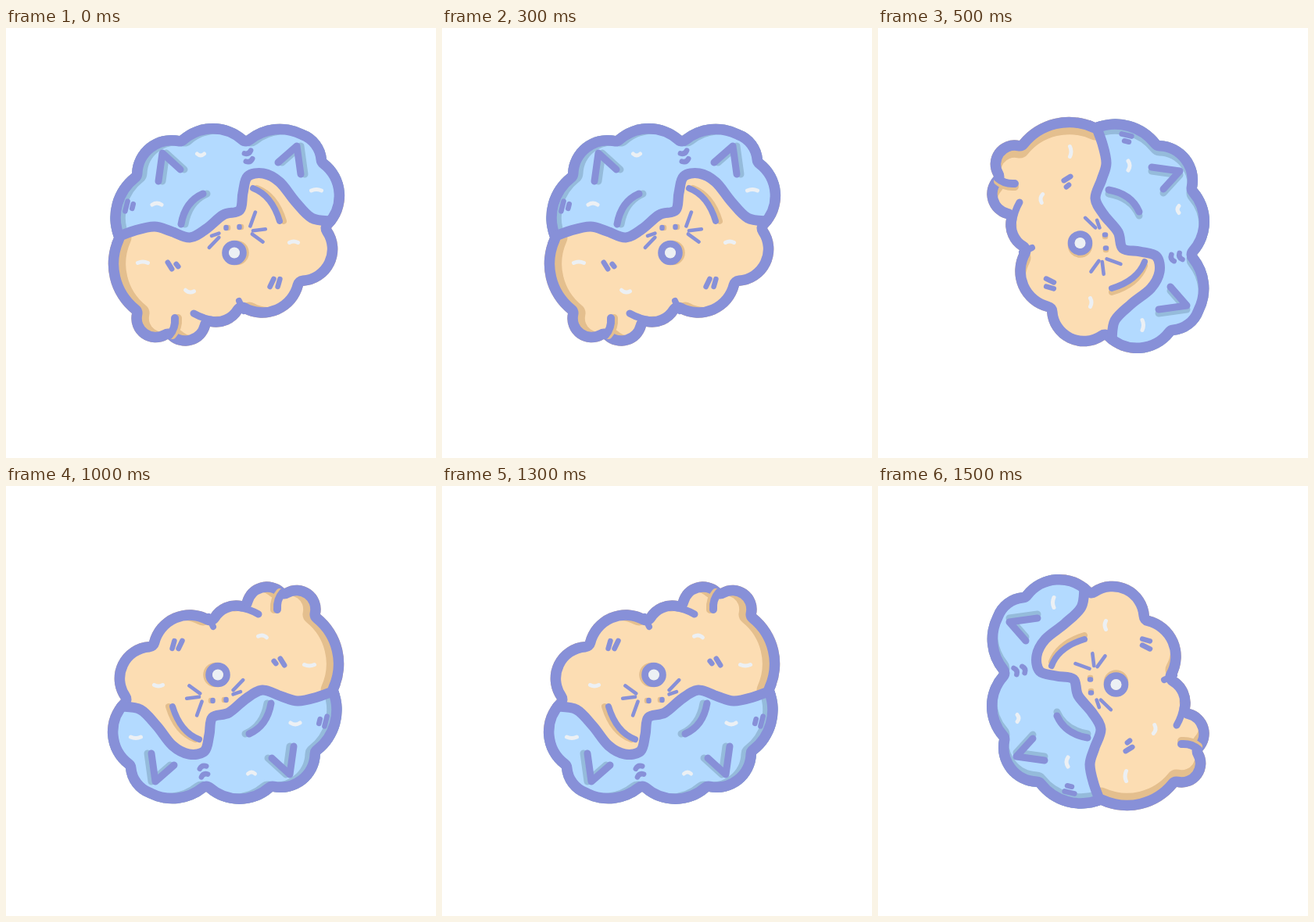
These frames come from a looping animation (550x550 px, 2000 ms). An HTML page:

```html
<!DOCTYPE html>
<html>
<head>
<meta charset="utf-8">
<style>
html, body { margin: 0; width: 100%; height: 100%; overflow: hidden; background: #fff; }
svg { display: block; width: 100vw; height: 100vh; }
</style>
</head>
<body>
<svg viewBox="0 0 550 550">
  <defs>
    <clipPath id="inside"><path id="insidePath"/></clipPath>
    <clipPath id="above"><path id="abovePath"/></clipPath>
  </defs>
  <g id="pet" fill="none" stroke-linecap="round" stroke-linejoin="round"></g>
</svg>
<script>
const NS = 'http://www.w3.org/2000/svg';
const byId = id => document.getElementById(id);
const pet = byId('pet');
const INK = '#8790d8', SHINE = '#ecf0f4';
const BLUE = { base: '#b3daff', shade: '#95bbdb', dx: 6 };
const PEACH = { base: '#fcddb3', shade: '#e4bf8e', dx: 9 };
const EDGE = 13.5;

function add(tag, attrs, parent = pet) {
  const el = document.createElementNS(NS, tag);
  for (const k in attrs) el.setAttribute(k, attrs[k]);
  return parent.appendChild(el);
}
const line = (d, stroke, width, dx = 0, parent = pet) =>
  add('path', { d, stroke, 'stroke-width': width, transform: `translate(${dx} 0)` }, parent);

// Round lobes: each reaches x, y with an arc that bulges out by h
function lobes(x, y, list) {
  let d = `M${x},${y}`;
  for (const [nx, ny, h] of list) {
    const half = Math.hypot(nx - x, ny - y) / 2;
    const r = (half * half + h * h) / (2 * h);
    d += `A${r},${r} 0 0 1 ${nx},${ny}`;
    [x, y] = [nx, ny];
  }
  return d + 'Z';
}

// Smooth curve through a few points
function curve(p) {
  let d = 'M' + p[0];
  for (let i = 0; i < p.length - 1; i++) {
    const a = p[i - 1] || p[i], b = p[i], c = p[i + 1], e = p[i + 2] || c;
    const h1 = b.map((v, k) => v + (c[k] - a[k]) / 6);
    const h2 = c.map((v, k) => v - (e[k] - b[k]) / 6);
    d += `C${h1} ${h2} ${c}`;
  }
  return d;
}

const body = lobes(138, 268, [
  [161, 186, 14], [222, 138, 18], [307, 138, 16], [381, 130, 11], [410, 168, 7],
  [416, 256, 20], [380, 330, 24], [302, 364, 21], [261, 382, 7],
  [207, 398, 16], [161, 365, 18.5], [138, 268, 17]
]);
const divider = curve([
  [138, 269], [165, 259], [190, 254], [211, 260], [235, 268], [256, 257], [278, 239], [299, 233],
  [303, 211], [309, 190], [329, 186], [350, 197], [370, 222], [391, 243], [416, 247]
]);
byId('insidePath').setAttribute('d', body);
byId('abovePath').setAttribute('d', divider + 'L550,0 L0,0Z');

// Coat with shade along every left-facing edge
const inside = add('g', { 'clip-path': 'url(#inside)' });
function coat(tone, clip) {
  const g = add('g', clip ? { 'clip-path': clip } : {}, inside);
  add('path', { d: body, fill: tone.base }, g);
  line(body, tone.shade, EDGE * 2, tone.dx, g);
}
coat(PEACH);
coat(BLUE, 'url(#above)');
line(body, INK, EDGE * 2, 0, inside);
line(divider, INK, 13, 0, inside);

// Ink stroke with a soft shadow to its right
function stamp(d, tone, width, dx = 5) {
  line(d, tone.shade, width, dx);
  line(d, INK, width);
}

// Ears, closed eyes, folds
stamp('M195,196 L200,160 L223,181', BLUE, 9);
stamp('M348,172 L372,151 L377,187', BLUE, 9);
stamp('M224,251 Q229,222 252,212', BLUE, 9);
stamp('M316,205 Q340,214 350,247', PEACH, 8);
stamp('M216,371 Q217,384 209,393', PEACH, 10, 4);
line('M240,365 Q252,372 267,374', INK, 9);
line('M298,349 L304,362', INK, 8);

// Snout
for (const [dx, tone] of [[3, PEACH.shade], [0, INK]])
  add('circle', { cx: 292 + dx, cy: 287.5, r: 11.3, stroke: tone, 'stroke-width': 9 });
add('circle', { cx: 292, cy: 287.5, r: 7, fill: SHINE });
stamp('M281.5,255 v1', PEACH, 6.5, 2.5);
stamp('M298.5,254 v1', PEACH, 6.5, 2.5);

// Whiskers fan out from a point: angle, inner and outer radius
function fan(x, y, rays) {
  for (const [deg, from, to] of rays) {
    const c = Math.cos(deg * Math.PI / 180), s = Math.sin(deg * Math.PI / 180);
    line(`M${x + c * from},${y + s * from} L${x + c * to},${y + s * to}`, INK, 4.6);
  }
}
fan(310, 260, [[-70, 7, 26], [-7, 6, 22], [36, 6, 23]]);
fan(280, 260, [[134, 11, 29], [161, 8, 18]]);

// Short strokes: centre, tilt, length, bend
function dash([x, y, deg, len, bend = 0], color, width) {
  const el = line(`M${-len / 2},0 Q0,${bend} ${len / 2},0`, color, width);
  el.setAttribute('transform', `translate(${x} ${y}) rotate(${deg})`);
}
const freckles = [
  [209.5, 304, 58, 10], [219, 303.5, 50, 4],
  [340, 326, 116, 11], [349, 326, 106, 10],
  [154, 228, 104, 13], [162, 228, 104, 6],
  [309, 158.5, -25, 9, 4], [311, 169, -22, 9, 4]
];
for (const f of freckles) dash(f, INK, 6.6);

const shines = [
  [249, 161, 0, 9, 4], [193, 226, 0, 12, -4], [397, 208, 0, 13, -3],
  [368, 274.5, 0, 11, -3], [175, 300.5, 0, 13, -3], [235, 336, 8, 11, 4]
];
for (const s of shines) dash(s, SHINE, 5);

// A quarter turn every half second
function draw(ms) {
  const turn = Math.floor(ms / 500) % 4;
  pet.setAttribute('transform', `rotate(${turn * 90} 281.5 264.5)`);
}
const start = performance.now();
function tick() {
  draw(Math.max(0, performance.now() - start));
  requestAnimationFrame(tick);
}
draw(0);
requestAnimationFrame(tick);
</script>
</body>
</html>
```
